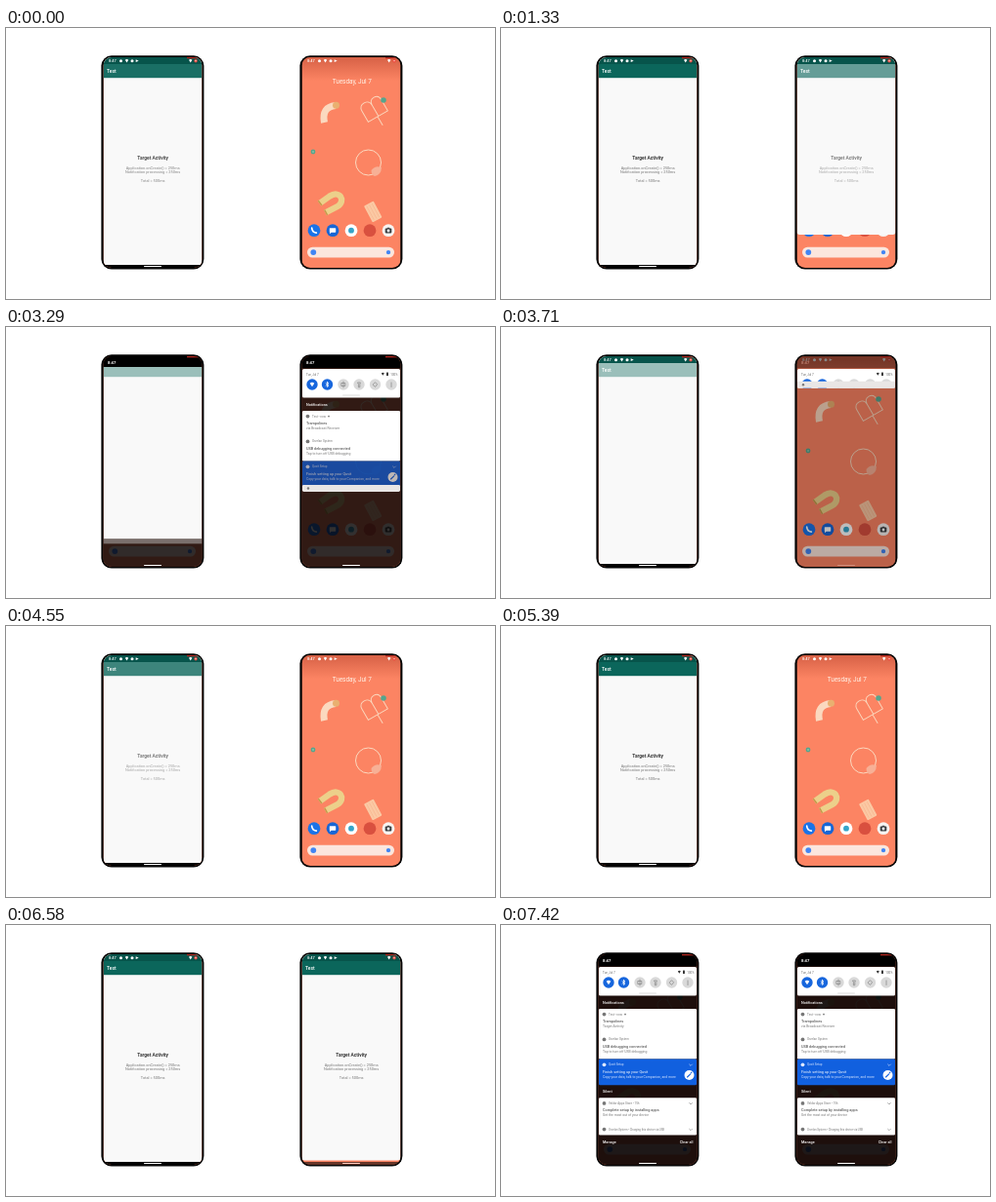
An HTML page for the animation above (7.49 s loop, 500x278 px).

```html
<!DOCTYPE html>
<html lang="en">
<head>
<meta charset="utf-8">
<title>Notification launch comparison</title>
<style>
html, body { margin: 0; width: 100%; height: 100%; overflow: hidden; background: #fff; }
svg { display: block; width: 100%; height: 100%; }
text { font-family: Roboto, Arial, sans-serif; }
</style>
</head>
<body>
<svg id="stage" viewBox="0 0 500 278"></svg>
<script>
const LOOP = 7490, CYCLE = 4830, SHADE_AT = 2170;
const TOP = 30, BOTTOM = 246, NAV = 243, LEFT = 99.5, WIDTH = 101;

const rect = (x, y, w, h, fill, r = 0, more = '') =>
  `<rect x="${x}" y="${y}" width="${w}" height="${h}" rx="${r}" fill="${fill}" ${more}/>`;
const dot = (x, y, r, fill) => `<circle cx="${x}" cy="${y}" r="${r}" fill="${fill}"/>`;
const line = (d, stroke, w, cap = 'round') =>
  `<path d="${d}" fill="none" stroke="${stroke}" stroke-width="${w}" stroke-linecap="${cap}" stroke-linejoin="round"/>`;
const fill = (d, color) => `<path d="${d}" fill="${color}"/>`;
const text = (x, y, size, color, str, weight = 400, anchor = 'start') =>
  `<text x="${x}" y="${y}" font-size="${size}" fill="${color}" font-weight="${weight}" text-anchor="${anchor}">${str}</text>`;
const group = (name, body, more = '') => `<g data-part="${name}" ${more}>${body}</g>`;
const wifi = (x, y, s, c) => fill(`M${x - s} ${y - s * .5}Q${x} ${y - s * 1.5} ${x + s} ${y - s * .5}L${x} ${y + s}Z`, c);
const chevron = (y, c) => line(`M192.6 ${y - .7}l1.4 1.4 1.4-1.4`, c, .6);
const navPill = () => rect(141, 244, 18, 1.1, '#fff', .5);
const recordMark = () => rect(185, TOP, 14, 1.3, '#b3261e');

function statusBar() {
  return recordMark() + text(105, 35.2, 3.9, '#fff', '8:47', 500) + dot(117.5, 33.7, 1.5, '#fff') +
    wifi(123.5, 33.7, 1.7, '#fff') + dot(129, 33.7, 1.5, '#fff') +
    fill('M132.7 32.3l3 1.4-3 1.4z', '#fff') + wifi(188.7, 33.7, 1.7, '#fff') +
    dot(194, 33.7, 1.7, '#f0453a') + dot(194, 33.7, .6, '#fff');
}

function homeScreen() {
  const cream = '#fbd9bf';
  const wallpaper =
    rect(LEFT, TOP, WIDTH, 217, '#fc8463') + rect(LEFT, TOP, WIDTH, 24, 'url(#topShade)') +
    line('M122.5 97Q119.5 81 134 79.5', cream, 7, 'butt') + dot(134.5, 79.3, 3.5, '#e9b070') +
    `<g transform="rotate(-30 173 84)">` +
      line('M162 92V79Q162 73 168 73T174 79V92ZM174 92V79Q174 73 179.500 73T185 79V92ZM173 92V102', cream, .9) + '</g>' +
    dot(183, 74, 2.8, '#55a58d') + dot(111, 127, 2.4, '#55a58d') + dot(111, 127, 1, '#8cc0a4') +
    `<circle cx="167.5" cy="138" r="13" fill="none" stroke="${cream}" stroke-width="1"/>` +
    fill('M170.500 146Q174.500 140.500 181 143Q180.500 151 174 152Q170.500 151 170.500 146Z', '#f7b096') +
    line('M117.500 180L128 172.500C138 166 145 177 136 183L123.500 189.500', '#ecd08a', 6.3, 'butt') +
    line('M117.500 180l1.200-.9M123.500 189.500l1.300-.7', '#c39a4c', 6, 'butt') +
    `<g transform="rotate(-28 172 188)">` + rect(166.5, 179, 11, 19, '#fbc9a4', 1) +
      line('M169 181v15M172 181v15M175 181v15', '#f6b48d', .6) + '</g>';
  const dock =
    [['#1a73e8', 112], ['#1766d6', 131], ['#fff', 150], ['#d9503f', 169], ['#f6f4f2', 188]]
      .map(([c, x]) => dot(x, 207.7, 6.4, c)).join('') +
    line('M109.700 205.200Q110 209.500 114.300 210.200', '#fff', 1.7) +
    rect(127.8, 205.2, 6.4, 4.5, '#fff', .6) + fill('M128 209l0 2.300 2-2z', '#fff') +
    dot(150, 207.7, 2.9, '#35a4c8') +
    rect(184.7, 205.6, 6.6, 4.8, '#3c4043', .8) + rect(186.7, 204.7, 2.6, 1.5, '#3c4043', .3) + dot(188, 208, 1.4, '#fff');
  const search = rect(105, 224.7, 89, 10.8, '#fce6dd', 5.4) + dot(111.3, 230.1, 2.9, '#4285f4') + dot(188, 230.1, 2.2, '#4285f4');
  return wallpaper + statusBar() + text(150.7, 57, 6.4, '#fff3e8', 'Tuesday, Jul 7', 400, 'middle') + dock + search;
}

const panel = (y, h, color) => rect(LEFT + .5, y, WIDTH - 1, h, color, 1.2);

function notice(y, app, title, sub, o = {}) {
  const ink = o.blue ? '#fff' : '#333', soft = o.blue ? '#dce8ff' : '#777';
  return dot(105.5, y + 5.6, 1.9, soft) + text(110, y + 6.6, o.small || 3, soft, app) +
    (title ? text(104, y + 13.9, 3.85, ink, title) + text(104, y + 18.8, 3.4, soft, sub) : '') +
    (o.arrow ? chevron(y + 6, soft) : '');
}

function quickSettings() {
  const glyph = ['', 'M125.500 56.500v5l1.500-1.300-3-2.500M125.500 56.500l1.500 1.300-3 2.500',
    'M140.200 57.500h3.600v3h-3.600zM142 56v6', 'M156.800 57h2.600l-.6 1.800v3h-1.400v-3z',
    'M172.600 58.500l2-1.700 2 2-2 2.600-2-1.600z', 'M191 57v4.500'];
  return rect(LEFT + .5, 43, WIDTH - 1, 29.5, '#fff', 1.5) +
    text(104, 49.7, 3, '#666', 'Tue, Jul 7') + wifi(182.3, 48.3, 1.5, '#333') +
    rect(186, 46.6, 1.9, 3.4, '#333', .3) + text(197.3, 49.7, 2.9, '#666', '100%', 400, 'end') +
    [110, 125.5, 142, 158, 174.5, 191].map((x, i) =>
      dot(x, 59, 5.7, i < 2 ? '#1766dd' : '#d9d9d9') +
      (i ? line(glyph[i], i < 2 ? '#fff' : '#888', .75) : wifi(x, 59, 2.3, '#fff'))).join('') +
    rect(141, 69.6, 18, .9, '#dedede', .4);
}

function shade(sub) {
  const upper = quickSettings() + text(104, 80.8, 3.8, '#fff', 'Notifications', 500) +
    panel(86, 51.5, '#fff') +
    notice(86, 'Test • now', 'Trampolines', sub) + dot(127, 91.6, .9, '#777') +
    notice(111.8, 'Orvelan System', 'USB debugging connected', 'Tap to turn off USB debugging');
  const lower = panel(137.5, 26.8, '#1160df') +
    notice(137.7, 'Quvit Setup', 'Finish setting up your Quvit', 'Copy your data, talk to your Companion, and more', { blue: 1, arrow: 1 }) +
    dot(192.5, 154, 5, '#fff') + line('M190.500 156l3.200-3.200M194.300 151.700l.6-.6', '#1160df', 1.1) +
    text(104, 172.2, 3.8, '#fff', 'Silent', 500) +
    panel(177.3, 38.2, '#fff') +
    notice(177.3, 'Veldor Apps Store • 15h', 'Complete setup by installing apps', 'Get the most out of your device', { arrow: 1 }) +
    notice(204, 'Orvelan System • Charging this device via USB', '', '', { arrow: 1, small: 2.8 }) +
    text(104, 223.5, 3.8, '#fff', 'Manage', 500) + text(196.5, 223.5, 3.8, '#fff', 'Clear all', 500, 'end');
  const shelf = panel(0, 7, '#e9e6e5') + dot(106, 3.5, 1.2, '#777');
  return upper + group('lower', lower) + group('shelf', shelf);
}

function activity() {
  const row = (y, str, size = 3.9, c = '#777', w = 400) => text(150.2, y, size, c, str, w, 'middle');
  return rect(LEFT, TOP, WIDTH, BOTTOM - TOP, '#f9f9f9') +
    group('header', rect(LEFT, 36.5, WIDTH, 14.7, '#0b665b')) +
    group('status', rect(LEFT, TOP, WIDTH, 7, '#07544b') + statusBar()) +
    group('label', text(103, 45.9, 5, '#fff', 'Test', 500)) +
    group('content', row(135, 'Target Activity', 4.85, '#333', 700) +
      row(144.8, 'Application.onCreate() = 250ms') + row(149.4, 'Notification processing = 250ms') +
      row(158.2, 'Total = 500ms'));
}

function phone(id, dx, sub) {
  return `<g id="${id}" transform="translate(${dx} 0)">
    <clipPath id="${id}Screen">${rect(LEFT, TOP, WIDTH, BOTTOM - TOP, '#000', 8.5)}</clipPath>
    <clipPath id="${id}Shade"><rect data-part="shadeClip" x="${LEFT}" y="${TOP}" width="${WIDTH}" height="216" rx="2"/></clipPath>
    <clipPath id="${id}Window"><rect data-part="windowClip" x="${LEFT}" y="${TOP}" width="${WIDTH}" height="216"/></clipPath>
    ${rect(97.4, 28.3, 105, 219.2, '#050505', 10.5)}
    <g clip-path="url(#${id}Screen)">
      ${homeScreen()}
      ${group('scrim', rect(LEFT, TOP, WIDTH, 217, '#060303'))}
      ${group('bar', rect(LEFT, TOP, WIDTH, 12, '#000') + recordMark() + text(104, 38, 4.2, '#fff', '8:47', 700) + navPill())}
      ${group('shade', shade(sub), `clip-path="url(#${id}Shade)"`)}
      ${group('shadow', rect(LEFT, 0, WIDTH, 5, '#8d8583'))}
      ${group('window', activity(), `clip-path="url(#${id}Window)"`)}
      ${group('nav', rect(LEFT, NAV, WIDTH, 5, '#000') + navPill())}
    </g></g>`;
}

const stage = document.getElementById('stage');
stage.innerHTML = `<defs><linearGradient id="topShade" x2="0" y2="1">
  <stop stop-color="#b8452f" stop-opacity=".55"/><stop offset="1" stop-color="#b8452f" stop-opacity="0"/>
  </linearGradient></defs>` + phone('direct', 0, 'Target Activity') + phone('relay', 203, 'via Broadcast Receiver');

const parts = id => Object.fromEntries(
  [...document.querySelectorAll(`#${id} [data-part]`)].map(el => [el.dataset.part, el]));
const direct = parts('direct'), relay = parts('relay');

const clamp = x => Math.max(0, Math.min(1, x));
const span = (t, from, to) => clamp((t - from) / (to - from));
const smooth = x => x * x * (3 - 2 * x);
const mix = (a, b, x) => a + (b - a) * x;
const alpha = (el, v) => el.setAttribute('opacity', v.toFixed(3));
const moveTo = (el, y) => el.setAttribute('transform', `translate(0 ${y})`);

function setClip(el, top, bottom, r) {
  el.setAttribute('y', top);
  el.setAttribute('height', Math.max(0, bottom - top));
  el.setAttribute('rx', r);
}

function setShade(p, q) {
  const bottom = q > 0 ? mix(218, TOP, q) : BOTTOM;
  alpha(p.scrim, .9 * (1 - Math.pow(q, 1.8)));
  alpha(p.bar, 1 - smooth(span(q, .5, 1)));
  alpha(p.lower, clamp(1 - q * 1.2));
  alpha(p.shelf, span(q, 0, .1));
  moveTo(p.shelf, bottom - 7);
  setClip(p.shadeClip, TOP, bottom, 2);
}

// Expands out of the tapped notification, then fades its content in.
function drawDirect(u) {
  const open = 1 - (1 - span(u, 2940, 3570)) ** 2;
  const fade = span(u, 3830, 4950);
  const started = u >= 2940, full = open >= 1;
  const top = mix(86, TOP, open), bottom = mix(112, NAV, open);
  setShade(direct, smooth(span(u, 2940, 3990)));
  alpha(direct.shade, 1 - span(u, 2940, 3200));
  alpha(direct.window, started ? 1 : 0);
  setClip(direct.windowClip, top, bottom, 0);
  alpha(direct.shadow, started && !full ? .8 : 0);
  moveTo(direct.shadow, bottom);
  alpha(direct.header, mix(.4, 1, fade));
  alpha(direct.status, full ? 1 : span(open, .9, 1));
  alpha(direct.label, full ? 1 : 0);
  alpha(direct.content, fade);
  alpha(direct.nav, full ? 1 : 0);
}

// The shade collapses to the home screen; the window unrolls later.
function drawRelay(u) {
  const open = span(u, 5460, 6720);
  const fade = span(u, 5520, 6560);
  setShade(relay, smooth(span(u, 2940, 3990)));
  alpha(relay.shade, u < 3990 ? 1 : 0);
  alpha(relay.shadow, 0);
  alpha(relay.window, span(open, 0, .15));
  setClip(relay.windowClip, TOP, NAV - 176 * Math.pow(1 - open, 2.14), open < 1 ? 3 : 0);
  alpha(relay.header, fade);
  alpha(relay.content, fade);
  alpha(relay.label, 1);
  alpha(relay.status, span(open, 0, .2));
  alpha(relay.nav, span(open, .8, .95));
}

function draw(t) {
  const u = SHADE_AT + (t - SHADE_AT + CYCLE) % CYCLE;
  drawDirect(u);
  drawRelay(u);
}

const start = performance.now();
function tick(now) {
  draw(Math.max(0, now - start) % LOOP);
  requestAnimationFrame(tick);
}
draw(0);
requestAnimationFrame(tick);
</script>
</body>
</html>
```
